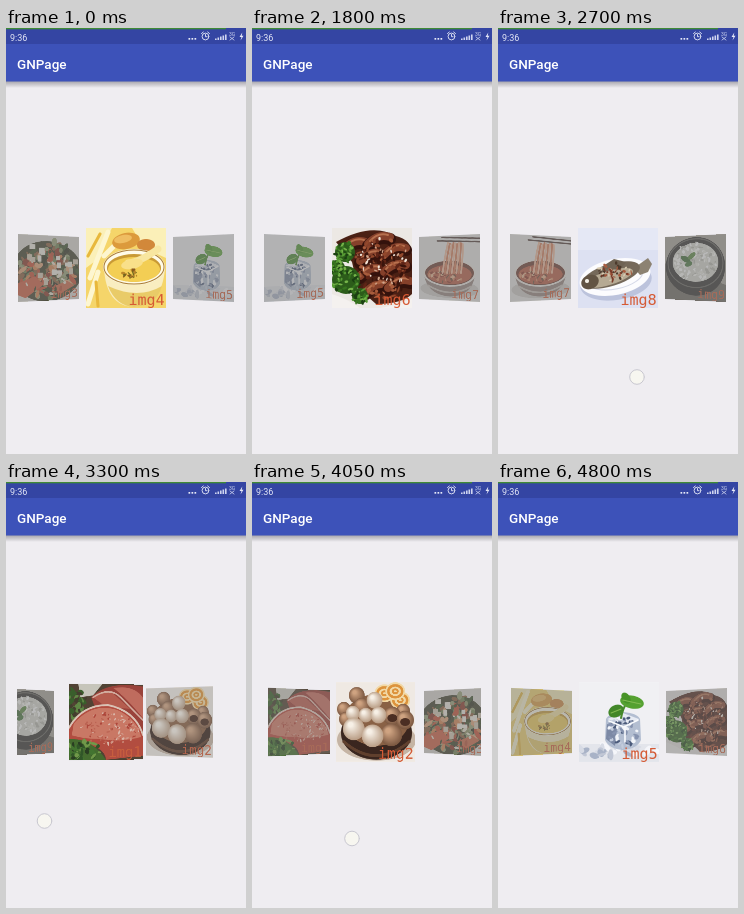
Write an HTML page with a canvas that moves like this. It is 240 by 426 pixels and loops after 4950 ms.

```html
<!DOCTYPE html>
<html lang="en">
<head>
<meta charset="utf-8">
<title>Card pager</title>
<style>
html, body { margin: 0; width: 100%; height: 100%; overflow: hidden; background: #efedf1; }
canvas { display: block; width: 240px; height: 426px; }
</style>
</head>
<body>
<canvas id="stage" width="240" height="426"></canvas>
<script>
const ctx = document.getElementById('stage').getContext('2d');
const LOOP = 4950, STEP = 150, CARD = 80, SPACING = 77.5;

// [time, page]
const pageKeys = [
  [0, 4], [1350, 4], [1500, 4.6], [1650, 5.7], [1800, 6], [2100, 6],
  [2250, 6.25], [2400, 7.2], [2550, 7.8], [2700, 8], [2850, 8.45],
  [3000, 9.4], [3150, 9.97], [3300, 10.29], [3450, 10.08], [3600, 10.2],
  [3750, 10.5], [3900, 10.8], [4050, 10.945], [4200, 11.6], [4350, 12.3],
  [4500, 13], [4650, 13.6], [4800, 13.99]
];

// time: finger position
const touches = {
  1350: [144, 348.5], 1500: [96, 334], 2250: [150, 328], 2700: [139, 349],
  2850: [88, 333], 3150: [92, 340], 3300: [38.5, 339], 3600: [130, 345],
  3750: [84, 345], 4050: [100, 356.5], 4200: [52, 335], 4350: [130, 328],
  4650: [96, 339]
};

function randomizer(seed) {
  return () => (seed = (seed * 16807) % 2147483647) / 2147483647;
}

function brush(g, seed) {
  const rnd = randomizer(seed);
  const b = {
    fill(color, x = 0, y = 0, w = CARD, h = CARD) {
      g.fillStyle = color;
      g.fillRect(x, y, w, h);
    },
    oval(color, x, y, rx, ry = rx, turn = 0) {
      g.fillStyle = color;
      g.beginPath();
      g.ellipse(x, y, rx, ry, turn, 0, 7);
      g.fill();
    },
    ball(light, dark, x, y, r) {
      const shade = g.createRadialGradient(x - r * 0.3, y - r * 0.4, r * 0.2, x, y, r * 1.1);
      shade.addColorStop(0, light);
      shade.addColorStop(1, dark);
      b.oval(shade, x, y, r, r * 1.05);
    },
    ring(color, width, x, y, rx, ry = rx, turn = 0) {
      g.strokeStyle = color;
      g.lineWidth = width;
      g.beginPath();
      g.ellipse(x, y, rx, ry, turn, 0, 7);
      g.stroke();
    },
    shape(color, path) {
      g.fillStyle = color;
      g.fill(new Path2D(path));
    },
    line(color, width, path) {
      g.strokeStyle = color;
      g.lineWidth = width;
      g.lineCap = 'round';
      g.stroke(new Path2D(path));
    },
    scatter(colors, count, x, y, rx, ry, size) {
      for (let i = 0; i < count; i++) {
        const a = rnd() * 6.283, r = Math.sqrt(rnd());
        b.oval(colors[i % colors.length], x + Math.cos(a) * r * rx, y + Math.sin(a) * r * ry,
          size * (0.5 + rnd()), size * (0.3 + rnd() * 0.5), rnd() * 3);
      }
    }
  };
  return b;
}

const dishes = {
  1: b => { // raw meat
    b.fill('#4a3a28');
    b.shape('#d5d3c6', 'M10 0H36L26 12L12 14Z');
    b.scatter(['#2f5a1e', '#3a3420', '#5c8a3c'], 30, 8, 22, 10, 16, 4);
    b.shape('#a03a30', 'M24 14Q42 -4 80 2V50L30 30Z');
    b.shape('#cc6a5a', 'M48 4Q70 0 80 14V36Q62 14 48 4Z');
    b.shape('#c05848', 'M26 14Q38 4 48 10L66 26L40 24Z');
    b.line('#e4b8a8', 1.6, 'M26 14Q44 2 56 14T80 38');
    b.shape('#bd4536', 'M0 46Q14 20 42 22Q72 28 80 54V76L40 80Q38 62 0 62Z');
    b.shape('#d87862', 'M5 42Q26 18 54 28Q74 38 78 56Q56 62 34 58Q18 58 3 54Z');
    b.line('#ecd0c0', 2, 'M0 46Q14 22 42 22Q72 28 80 54');
    b.scatter(['#ecc4b4', '#e09a86', '#b83e30', '#c8604c'], 100, 44, 47, 32, 17, 1.5);
    b.shape('#3c6a22', 'M0 58Q24 56 40 80H0Z');
    b.scatter(['#24501a', '#6f9e40', '#3a7424', '#1c3412'], 50, 16, 70, 19, 10, 3);
  },
  2: b => { // mushroom bowl
    b.fill('#f3ede7');
    b.oval('#c8b6a6', 41, 58, 40, 21);
    b.oval('#38241c', 41, 51, 36, 27);
    b.line('#5f3e2c', 3, 'M8 60Q40 88 74 60');
    b.oval('#8a6044', 41, 38, 33, 26);
    for (const [x, y] of [[49, 11], [65, 18], [60, 9]]) {
      b.oval('#f6dca8', x, y, 10, 9);
      b.ring('#e0943a', 2.5, x, y, 7, 6);
      b.ring('#e0943a', 2, x, y, 2.5, 2);
    }
    for (const [x, y, r] of [[21, 13, 8], [8, 27, 7], [68, 29, 7], [26, 24, 8], [57, 34, 9], [70, 38, 9], [10, 37, 7], [56, 53, 11]]) {
      b.ball('#d2a582', '#74503a', x, y, r);
    }
    b.oval('#4a2c20', 57, 36, 5, 4);
    b.oval('#4a2c20', 70, 40, 5, 4);
    for (const [x, y, r] of [[39, 18, 8], [17, 31, 7], [30, 33, 7], [43, 33, 8], [18, 47, 11], [37, 54, 11]]) {
      b.ball('#fbf4ea', '#b89a80', x, y, r);
    }
  },
  3: b => { // salad
    b.fill('#dedbd4');
    b.oval('#3a3a24', 38, 44, 46, 37);
    b.scatter(['#3a5028', '#708050', '#2a2c1c', '#96a074', '#8a5a38'], 90, 40, 42, 42, 35, 5);
    b.scatter(['#c8482c', '#d8804a', '#8a3020', '#e0a274'], 44, 38, 46, 37, 29, 5);
    b.shape('#d2583a', 'M0 58L22 50L34 60L10 76L0 72Z');
    b.shape('#cc6240', 'M44 64L64 56L74 62L56 72Z');
    b.scatter(['#34401f', '#e8e0cc', '#b84a2e', '#8a9060'], 40, 40, 42, 36, 30, 3);
    const rnd = randomizer(71);
    for (let i = 0; i < 18; i++) {
      b.fill(i % 3 ? '#f2ede2' : '#d6c8b2', 12 + rnd() * 60, 8 + rnd() * 46, 4 + rnd() * 4, 4 + rnd() * 4);
    }
  },
  4: b => { // soup
    b.fill('#f5d56a');
    b.shape('#fbf0b8', 'M0 0H26L8 34L0 40ZM46 0H80V30L58 20Z');
    b.line('#fdf6d0', 5, 'M22 4L4 50M12 44L2 76M30 16L18 28');
    b.line('#e8b83c', 3, 'M14 6L2 28M10 54L12 78');
    b.oval('#dc9a3c', 40, 13, 14, 8, -0.2);
    b.oval('#efbd62', 37, 11, 9, 4, -0.2);
    b.oval('#d2883a', 60, 17, 9, 6);
    b.shape('#f9edc0', 'M18 40Q20 78 48 79Q76 78 79 40Z');
    b.shape('#e9cb68', 'M22 58Q30 78 48 79Q70 78 76 58Q52 72 22 58Z');
    b.oval('#fffbe8', 48, 39, 31, 18);
    b.ring('#a87a34', 1, 48, 39, 30, 17);
    b.oval('#c99a35', 48, 40, 27, 14);
    b.oval('#f3ce54', 48, 41.5, 26, 12.5);
    b.line('#f8e6a0', 7, 'M42 35Q54 34 72 21');
    b.oval('#f9e08a', 46, 36, 11, 5, -0.2);
    b.scatter(['#8a5a1e', '#b8862a', '#6f6a20'], 18, 46, 45, 11, 5, 1.8);
  },
  5: b => { // ice and mint
    b.fill('#f1f1f4');
    b.fill('#e4e6ec', 0, 62, 80, 18);
    b.scatter(['#c2c8d6', '#f6f7fb', '#aab4c8', '#d8dce6'], 34, 38, 69, 40, 7, 4);
    b.shape('#b4bfd2', 'M27 37Q30 31 44 30Q58 31 61 37L62 58Q58 67 44 68Q30 67 26 58Z');
    b.shape('#e8ecf4', 'M28 37L44 31L60 37L46 43Z');
    b.shape('#7d8aa6', 'M28 42L38 46L36 64L27 57Z');
    b.scatter(['#f2f5fa', '#4c5c7c', '#c4cddd', '#8794b0'], 60, 44, 50, 15, 15, 2.6);
    b.line('#fafcff', 1.6, 'M46 44V60M30 39L45 45L59 38');
    b.line('#4a8a2c', 2, 'M42 36Q44 26 48 20');
    b.oval('#43882a', 37, 29, 8, 6, -0.5);
    b.oval('#56a232', 53, 20, 12, 6.5, 0.2);
    b.oval('#489428', 47, 16, 6, 4, 1);
    b.line('#84bc54', 1, 'M44 18L62 22M32 31L42 27');
  },
  6: b => { // ribs
    b.fill('#ece8e4');
    b.shape('#4a2014', 'M4 14Q40 -6 64 8Q80 12 80 26V66Q70 76 44 76L26 60L20 34Z');
    const rows = [[12, 20], [36, 15], [28, 32], [52, 26], [28, 47], [52, 43], [34, 63], [56, 59]];
    for (const [x, y] of rows) {
      b.line('#34120c', 12, `M${x} ${y + 3}Q${x + 10} ${y - 8} ${x + 22} ${y - 4}`);
      b.line('#85402a', 8, `M${x} ${y + 1}Q${x + 10} ${y - 10} ${x + 22} ${y - 6}`);
      b.line('#b8714e', 2, `M${x + 2} ${y - 2}Q${x + 10} ${y - 11} ${x + 20} ${y - 8}`);
    }
    b.scatter(['#a85c3c', '#3a140c', '#92482c', '#5f2416'], 110, 50, 40, 28, 31, 2.4);
    b.scatter(['#f0e4d8', '#cfa48a'], 34, 50, 36, 27, 27, 1.5);
    for (const [x, y, r] of [[13, 24, 10], [14, 52, 14], [5, 40, 8], [28, 68, 8]]) {
      b.oval('#2c5c1a', x, y, r);
      b.scatter(['#569a34', '#1b4012', '#76b44a', '#36741f'], 36, x, y, r, r, 2);
    }
    b.shape('#f4f1ef', 'M0 66Q18 72 28 80H0ZM80 70Q70 76 48 80H80Z');
  },
  7: b => { // noodles
    b.fill('#e9e7e4');
    b.oval('#cfcac6', 40, 66, 38, 11);
    b.shape('#94827a', 'M6 46Q10 74 40 75Q70 74 74 46Z');
    b.line('#c8beb6', 2, 'M12 62Q40 78 68 62');
    b.oval('#ece6e0', 40, 46, 35, 17);
    b.oval('#6a3628', 40, 46, 32, 15);
    b.oval('#b8553c', 40, 48, 29, 12);
    b.scatter(['#d88a62', '#8a3424', '#e8b48c', '#6a4a34'], 46, 38, 49, 26, 9, 2.2);
    for (let i = 0; i < 9; i++) {
      b.line(i % 2 ? '#d67a54' : '#efb898', 2.4, `M${38 + i * 2.4} ${9 + i % 3}Q${34 + i * 3} 24 ${31 + i * 3} 46`);
    }
    b.line('#4a3630', 1.8, 'M24 6L80 9M30 2L80 5');
  },
  8: b => { // fish
    b.fill('#dde1f2');
    b.fill('#e5e8f5', 0, 0, 80, 22);
    b.oval('#bcc3dc', 38, 54, 36, 18, -0.15);
    b.oval('#fcfcfe', 37, 49, 36, 18, -0.2);
    b.ring('#d4d8e8', 1, 37, 49, 28, 12, -0.2);
    b.shape('#8c8272', 'M56 40L70 30L74 36L70 44L62 47Z');
    b.oval('#75695a', 33, 47, 30, 11, -0.3);
    b.oval('#b6aa94', 31, 50, 25, 7, -0.3);
    b.oval('#625444', 12, 54, 9, 7, -0.4);
    b.oval('#f4f0e6', 9, 53, 2);
    b.shape('#6f6354', 'M22 40L36 31L48 34L42 42Z');
    b.scatter(['#7a3a28', '#4c3a2c', '#a85c40', '#d8cab0'], 50, 37, 44, 18, 9, 1.8);
  },
  9: b => { // rice
    b.fill('#a9a39a');
    b.shape('#6c665e', 'M0 34L80 60V80H0Z');
    b.oval('#2c2a28', 40, 38, 39, 36);
    b.ring('#5c5a54', 1.5, 40, 34, 36, 30);
    b.oval('#d8d8d0', 40, 33, 30, 24);
    b.scatter(['#fbfbf6', '#e6e6de', '#ffffff', '#b6b6ac'], 110, 40, 32, 29, 23, 2.4);
    b.oval('#3c6a30', 27, 29, 7, 3.5, 0.5);
    b.oval('#58883e', 35, 25, 6, 3, -0.7);
    b.oval('#44743a', 31, 35, 5, 3, -0.4);
  }
};

function makeCard(number) {
  const canvas = document.createElement('canvas');
  canvas.width = canvas.height = CARD * 2;
  const g = canvas.getContext('2d');
  g.scale(2, 2);
  dishes[number](brush(g, number * 7919));
  g.font = '15px "DejaVu Sans Mono", monospace';
  g.fillStyle = '#d65a34';
  g.fillText('img' + number, 42.5, 77);
  return canvas;
}

const cards = {};
for (let n = 1; n <= 9; n++) cards[n] = makeCard(n);

function pageAt(time) {
  const next = pageKeys.findIndex(key => key[0] > time);
  if (next < 0) return pageKeys[pageKeys.length - 1][1];
  const [t0, p0] = pageKeys[next - 1], [t1, p1] = pageKeys[next];
  return p0 + (p1 - p0) * (time - t0) / (t1 - t0);
}

// Cards shrink, darken and turn their inner edge away as they leave the centre.
function drawCard(index, offset) {
  const distance = Math.abs(offset), away = Math.min(1, distance);
  const width = Math.round(CARD - 19 * distance);
  const shift = Math.sign(offset) * SPACING * Math.min(distance, distance ** 1.08);
  const left = Math.round(120 + shift - width / 2);
  const outer = CARD - 12 * away, inner = CARD - 18 * away;
  const [start, end] = offset < 0 ? [outer, inner] : [inner, outer];
  const card = cards[(index - 1) % 9 + 1];
  const slice = card.width / width;
  ctx.fillStyle = `rgba(124,124,124,${0.54 * away})`;
  for (let i = 0; i < width; i++) {
    const height = start + (end - start) * (i + 0.5) / width;
    ctx.drawImage(card, i * slice, 0, slice, card.height, left + i, 240 - height / 2, 1, height);
    ctx.fillRect(left + i, 240 - height / 2, 1, height);
  }
}

function drawPager(page) {
  ctx.save();
  ctx.beginPath();
  ctx.rect(11, 190, 218, 100);
  ctx.clip();
  const near = Math.round(page);
  [near - 2, near + 2, near - 1, near + 1, near].forEach(i => {
    if (Math.abs(i - page) < 2) drawCard(i, i - page);
  });
  ctx.restore();
}

function drawBars() {
  const b = brush(ctx, 1);
  const shadow = ctx.createLinearGradient(0, 53, 0, 60);
  shadow.addColorStop(0, 'rgba(60,60,70,.42)');
  shadow.addColorStop(1, 'rgba(60,60,70,0)');
  b.fill(shadow, 0, 53, 240, 7);
  b.fill('#3d52b9', 0, 16, 240, 37.5);
  b.fill('#3445a3', 0, 0, 240, 16);
  b.fill('#3f8a35', 0, 0, 220, 1.3);

  ctx.fillStyle = '#fff';
  ctx.font = '500 13.5px Roboto, sans-serif';
  ctx.fillText('GNPage', 11, 41);
  ctx.fillStyle = '#e6e9f8';
  ctx.font = '9px Roboto, sans-serif';
  ctx.fillText('9:36', 4, 12.5);

  for (let i = 0; i < 3; i++) b.fill('#e6e9f8', 182.5 + i * 3, 10, 1.7, 1.7);
  b.ring('#e6e9f8', 0.9, 199.5, 8.5, 3.4);
  b.line('#e6e9f8', 0.9, 'M199.5 6.5V8.7H201M195.5 5.5L197.3 4M203.5 5.5L201.7 4');
  for (let i = 0; i < 5; i++) b.fill('#cfd5f0', 209 + i * 2.5, 10.5 - i, 1.6, 1.5 + i);
  ctx.font = '5px Roboto, sans-serif';
  ctx.fillText('3G', 223, 7.5);
  b.line('#cfd5f0', 0.8, 'M224 9L228 12M228 9L224 12');
  b.shape('#e6e9f8', 'M236.3 4.5L233.5 9H235.5L234.5 12.5L237.5 7.8H235.7Z');
}

function drawTouch(point) {
  if (!point) return;
  const b = brush(ctx, 1);
  b.oval('#f7f6f0', ...point, 7.3);
  b.ring('#c8c7d0', 1, ...point, 7.3);
}

function draw(now) {
  const time = Math.floor(now % LOOP / STEP) * STEP;
  ctx.fillStyle = '#efedf1';
  ctx.fillRect(0, 0, 240, 426);
  drawBars();
  drawPager(pageAt(time));
  drawTouch(touches[time]);
}

const begin = performance.now();
function tick() {
  draw(performance.now() - begin);
  requestAnimationFrame(tick);
}
tick();
</script>
</body>
</html>
```
